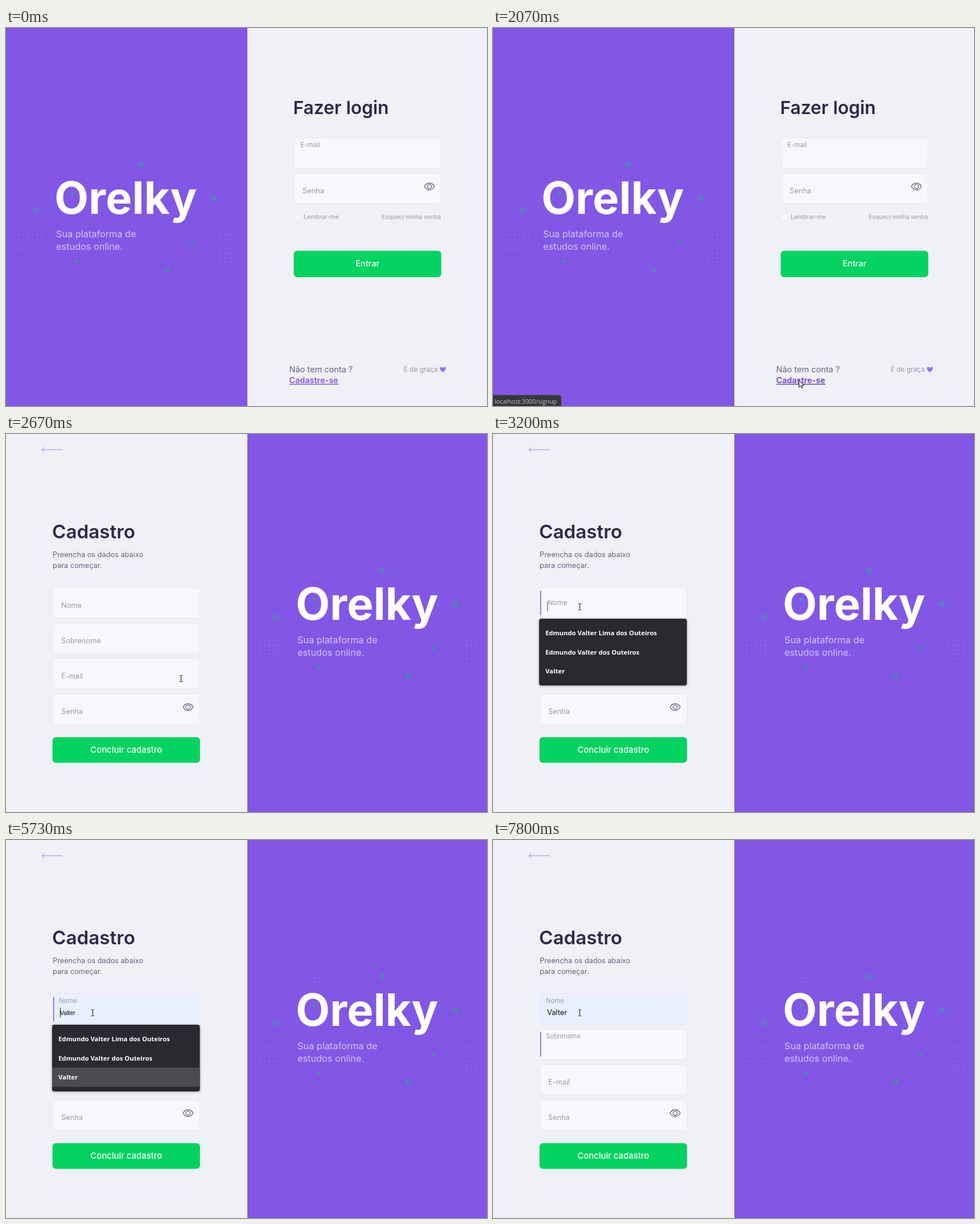
Recreate the animation shown at these times as an HTML page with a canvas. Size 845x663 px, loop 8 s.

```html
<!DOCTYPE html>
<html lang="pt-BR">
<head>
<meta charset="utf-8">
<title>Fazer login</title>
<style>
  html, body { margin: 0; width: 100%; height: 100%; overflow: hidden; background: #f0f0f7; }
  canvas { display: block; }
</style>
</head>
<body>
<canvas id="stage" width="845" height="663"></canvas>
<script>
const ctx = document.getElementById('stage').getContext('2d');
const LOOP = 8000, STEP = 200 / 3, HALF = 424;
const UI = 'Inter, sans-serif', SYSTEM = '"Open Sans", sans-serif', PLAIN = '"Liberation Sans", Arial, sans-serif';
const PURPLE = '#8257e5', PAGE = '#f0f0f7', INPUT = '#f8f8fc', FILLED = '#e8f0fe', LINE = '#e6e6f0';
const TITLE = '#32264d', BASE = '#6a6180', SOFT = '#9c98a6', GREEN = '#04d361', MARK = '#16bb84', DOT = '#9871f5';
const NAMES = ['Edmundo Valter Lima dos Outeiros', 'Edmundo Valter dos Outeiros', 'Valter'];
const LABELS = ['Nome', 'Sobrenome', 'E-mail', 'Senha'];

const clamp = v => Math.min(1, Math.max(0, v));
const mix = (a, b, p) => a + (b - a) * p;
const ramp = (t, from, to) => clamp((t - from) / (to - from));
const smooth = p => p * p * (3 - 2 * p);
const within = (t, from, to) => t >= from && t < to;

function text(str, x, y, size, color, { weight = 400, align = 'left', family = UI } = {}) {
  ctx.font = `${weight} ${size}px ${family}`;
  ctx.textAlign = align;
  ctx.fillStyle = color;
  ctx.fillText(str, x, y);
}

function rect(x, y, w, h, color) {
  ctx.fillStyle = color;
  ctx.fillRect(x, y, w, h);
}

function box(x, y, w, h, r, fill, line) {
  ctx.beginPath();
  ctx.roundRect(x, y, w, h, r);
  ctx.fillStyle = fill;
  ctx.fill();
  if (line) {
    ctx.strokeStyle = line;
    ctx.lineWidth = 1;
    ctx.stroke();
  }
}

function strokes(color, width, ...lines) {
  ctx.strokeStyle = color;
  ctx.lineWidth = width;
  ctx.beginPath();
  for (const [x1, y1, x2, y2] of lines) {
    ctx.moveTo(x1, y1);
    ctx.lineTo(x2, y2);
  }
  ctx.stroke();
}

function ring(x, y, r, color, width) {
  ctx.beginPath();
  ctx.arc(x, y, r, 0, Math.PI * 2);
  ctx.strokeStyle = color;
  ctx.lineWidth = width;
  ctx.stroke();
}

function dots(x, y, cols, rows, gap = 8) {
  ctx.fillStyle = DOT;
  for (let i = 0; i < cols * rows; i++) {
    ctx.beginPath();
    ctx.arc(x + (i % cols) * gap, y + Math.floor(i / cols) * 8, 1, 0, Math.PI * 2);
    ctx.fill();
  }
}

function hero(left) {
  ctx.save();
  ctx.translate(left, 0);
  rect(0, 0, HALF, 663, PURPLE);
  dots(110, 242, 3, 2);
  dots(285, 284, 3, 1);
  dots(22.5, 363, 6, 4);
  dots(377, 363, 4, 7, 8.4);
  for (const [x, y] of [[237, 240], [52, 321], [365, 298.5], [283, 424.5]]) ring(x, y, 3.4, MARK, 1.3);
  strokes(MARK, 1.2, [367.5, 301, 370.5, 303]);
  strokes(MARK, 1.3, [122, 409, 128, 409], [125, 406, 125, 412]);
  for (const [x, y] of [[117, 290], [327, 376]]) {
    strokes(MARK, 1.3, [x - 2, y - 2, x + 2, y + 2], [x - 2, y + 2, x + 2, y - 2]);
  }
  text('Orelky', 85, 326, 78, '#fff', { weight: 700 });
  text('Sua plataforma de', 88, 367, 16.3, '#d4c2ff');
  text('estudos online.', 88, 389, 16.3, '#d4c2ff');
  ctx.restore();
}

function eye(x, y) {
  ctx.strokeStyle = BASE;
  ctx.lineWidth = 1.3;
  ctx.beginPath();
  ctx.moveTo(x - 9, y);
  ctx.bezierCurveTo(x - 4.5, y - 8, x + 4.5, y - 8, x + 9, y);
  ctx.bezierCurveTo(x + 4.5, y + 8, x - 4.5, y + 8, x - 9, y);
  ctx.stroke();
  ring(x, y, 3.7, BASE, 1.3);
}

function heart(x, y) {
  ctx.fillStyle = DOT;
  ctx.beginPath();
  ctx.moveTo(x, y + 5);
  ctx.bezierCurveTo(x - 9, y - 1, x - 4.5, y - 7.5, x, y - 2.8);
  ctx.bezierCurveTo(x + 4.5, y - 7.5, x + 9, y - 1, x, y + 5);
  ctx.fill();
}

function field(x, y, fill = INPUT) {
  box(x + 0.5, y + 0.5, 258, 53.5, 6, fill, LINE);
}

function button(label, x, y, h, size) {
  box(x, y, 259.2, h, 6, GREEN);
  text(label, x + 129.6, y + 27.6, size, '#fff', { weight: 500, align: 'center' });
}

function login(t) {
  hero(0);
  text('Fazer login', 504.5, 151, 31.7, TITLE, { weight: 600 });
  field(505.7, 192.5);
  field(505.7, 254.5);
  text('E-mail', 517, 209, 11.6, SOFT);
  text('Senha', 521, 290, 12.8, SOFT);
  eye(743.8, 278);
  box(506.5, 325.5, 12, 12, 3, INPUT, LINE);
  text('Lembrar-me', 523, 335, 10.6, SOFT);
  text('Esqueci minha senha', 764, 335, 10.4, SOFT, { align: 'right' });
  button('Entrar', 505.5, 390.7, 46.4, 14.6);
  text('Não tem conta ?', 497.5, 604, 14.5, BASE);
  const link = t >= 1400 ? '#6842c2' : PURPLE;
  text('Cadastre-se', 497.5, 623, 14.4, link, { weight: 600 });
  rect(498, 624, 86, 1.5, link);
  text('É de graça', 698.5, 603, 11.9, SOFT);
  heart(767.5, 599);
}

function caret(t) {
  if (within(t, 3200, 3670) || within(t, 4200, 5200) || within(t, 5730, 6270)) {
    rect(95, 294, 1, 17, t < 4670 ? '#666' : '#000');
  }
  if (within(t, 6400, 6870)) rect(131, 294, 1, 17, '#000');
  if (within(t, 7270, 7800)) rect(95, 356, 1, 17, '#000');
}

function suggestions(active) {
  ctx.save();
  ctx.shadowColor = 'rgba(0,0,0,.4)';
  ctx.shadowBlur = 4;
  ctx.shadowOffsetY = 1;
  box(81, 324, 259.5, 117, 4, '#292a2d');
  ctx.restore();
  NAMES.forEach((name, i) => {
    if (i === active) rect(81, 332 + i * 33.6, 259.5, 33.6, '#4b4c4f');
    text(name, 92, 353 + i * 33.6, 11.3, '#fff', { weight: 700, family: SYSTEM });
  });
}

function signup(t) {
  hero(HALF);
  if (t >= 2330) strokes('#c0a6f2', 1.3, [63, 27.5, 99.5, 27.5], [63, 27.5, 67.5, 23.5], [63, 27.5, 67.5, 31.5]);
  text('Cadastro', 81, 183, 33.2, TITLE, { weight: 600 });
  text('Preencha os dados abaixo', 82, 216, 12.75, BASE);
  text('para começar.', 82, 234.5, 12.75, BASE);

  const active = t < 4670 ? -1 : t < 4800 ? 0 : t < 4930 ? 1 : 2;
  const focus = t < 3130 ? -1 : t < 7270 ? 0 : 1;
  const lifts = [ramp(t, 3130, 3400), ramp(t, 7230, 7530), 0, 0];
  LABELS.forEach((label, i) => {
    const y = 269 + i * 62.1, p = lifts[i];
    field(82, y, i === 0 && active >= 0 ? FILLED : INPUT);
    if (i === focus) rect(83, Math.round(y + 6), 1.5, 43, PURPLE);
    text(label, mix(97, 93, p), mix(y + 35.5, y + 17, p), mix(12.8, 11.2, p), SOFT);
  });
  eye(320, 479);
  button('Concluir cadastro', 81.65, 531.7, 45, 14.9);

  if (t >= 6330) text(NAMES[2], 95, 307, 12.8, '#111');
  else if (active >= 0) text(NAMES[active], 95, 307, 10.4, '#000', { family: PLAIN });
  caret(t);
  if (within(t, 3200, 6330)) suggestions(active);
}

function pointer(t) {
  if (t < 1470) {
    const p = 1 - (1 - ramp(t, 560, 1400)) ** 1.6, q = 1 - p;
    return [q * q * 848 + 2 * p * q * 680 + p * p * 545, q * q * 484 + 2 * p * q * 660 + p * p * 628];
  }
  if (t <= 2130) {
    const p = smooth(ramp(t, 1400, 1870));
    return [mix(545, 537.5, p), mix(628, 617.5, p)];
  }
  const p = smooth(ramp(t, 2070, 3130));
  return [mix(537.5, 152, p), mix(617.5, 303, p)];
}

function arrow(x, y) {
  ctx.beginPath();
  for (const [dx, dy] of [[0, 0], [0, 12.5], [2.8, 9.8], [4.8, 14.3], [6.8, 13.4], [4.9, 9], [8.8, 9]]) ctx.lineTo(x + dx, y + dy);
  ctx.closePath();
  ctx.fillStyle = '#fff';
  ctx.fill();
  ctx.strokeStyle = '#000';
  ctx.lineWidth = 1;
  ctx.stroke();
}

function ibeam(x, y) {
  rect(x - 0.5, y - 5, 1, 10, '#111');
  for (const end of [-6, 5]) {
    rect(x - 2.5, y + end, 2, 1, '#111');
    rect(x + 0.5, y + end, 2, 1, '#111');
  }
}

function cursor(t) {
  if (t < 600) return;
  const [x, y] = pointer(t);
  const overField = t >= 2130 && within(x, 82, 340) && within(y, 269, 510) && (y - 269) % 62.1 < 54;
  if (overField) ibeam(Math.round(x) + 0.5, Math.round(y));
  else arrow(x, y);
}

function statusBar() {
  box(-1, 644, 120.5, 20, [0, 4, 0, 0], '#35363a', '#46474b');
  text('localhost:3000/signup', 3, 658.5, 10.7, '#c4c7cb', { family: SYSTEM });
}

function draw(now) {
  // The screen updates fifteen times a second, on times rounded to 10 ms.
  const t = Math.round(Math.floor((now % LOOP + 3.4) / STEP) * STEP / 10) * 10 % LOOP;
  rect(0, 0, 845, 663, PAGE);
  if (t < 2130) login(t);
  else signup(t);
  if (within(t, 1470, 2470)) statusBar();
  cursor(t);
}

const start = performance.now();
function tick() {
  draw(performance.now() - start);
  requestAnimationFrame(tick);
}
tick();
</script>
</body>
</html>
```
